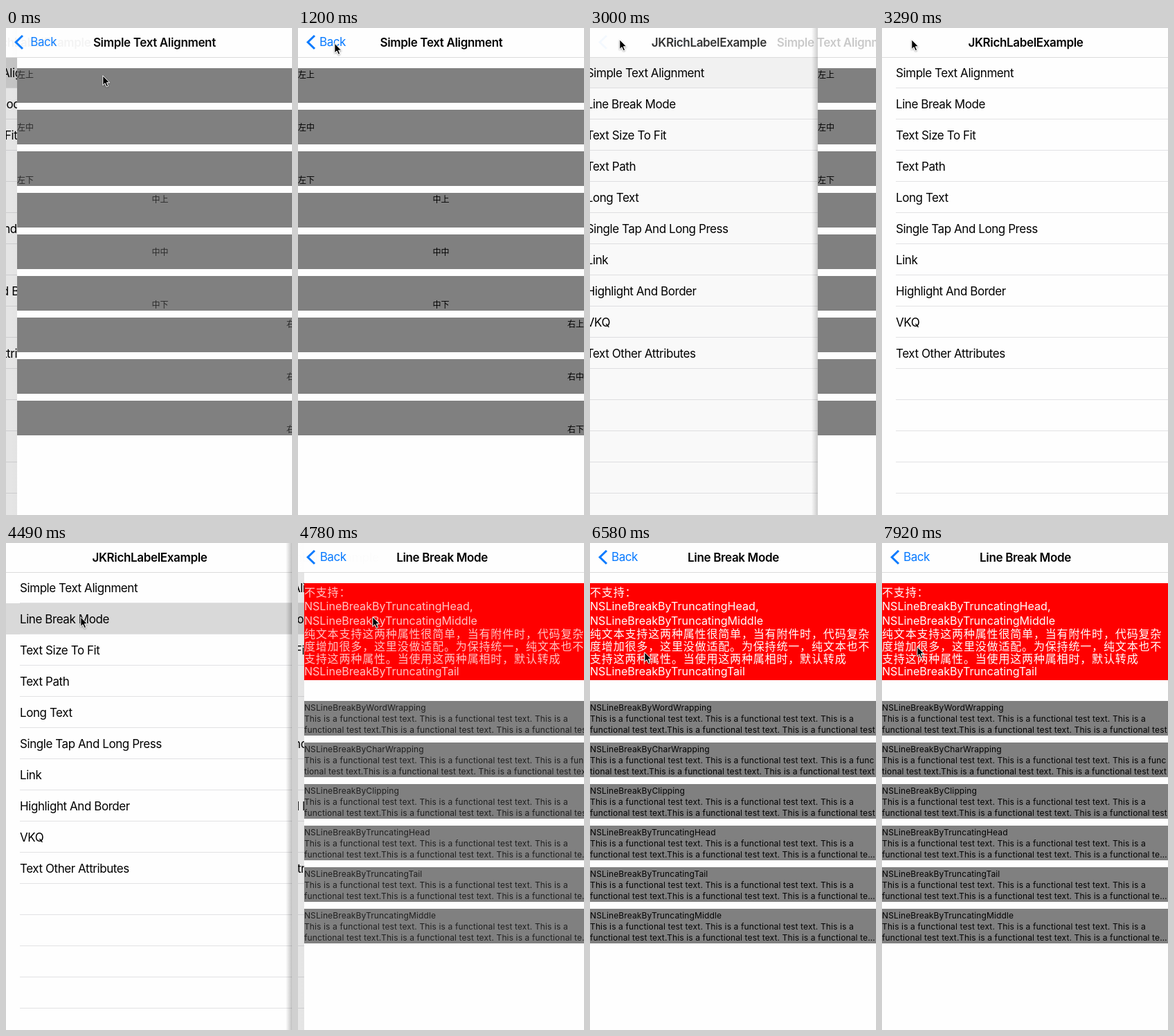
An HTML page for the animation above (8 s loop, 413 px wide and 703 px high).

```html
<!DOCTYPE html>
<html lang="zh-CN">
<head>
<meta charset="utf-8">
<title>Rich label demo</title>
<style>
  html, body { margin: 0; width: 100%; height: 100%; overflow: hidden; background: #fefefe; }
  svg { display: block; width: 100%; height: 100%; }
  text { font-family: Inter, "Noto Sans CJK SC", "Noto Sans CJK", sans-serif; white-space: pre; }
  .title { font-size: 17px; font-weight: 600; letter-spacing: -.34px; text-anchor: middle; }
  .row, .back { font-size: 17px; letter-spacing: -.43px; }
  .note { font-size: 16px; letter-spacing: .05px; fill: #fff; }
  .cjk { font-family: "Noto Sans CJK SC", "Noto Sans CJK", sans-serif; letter-spacing: .84px; }
  .small { font-size: 12px; letter-spacing: .13px; }
  .word { font-size: 12px; font-family: "Noto Sans CJK SC", "Noto Sans CJK", sans-serif; }
</style>
</head>
<body>
<svg viewBox="0 0 413 703" preserveAspectRatio="none">
  <defs>
    <linearGradient id="edge">
      <stop offset="0" stop-opacity="0"/>
      <stop offset="1" stop-opacity=".24"/>
    </linearGradient>
    <filter id="soft" x="-50%" y="-50%" width="200%" height="200%">
      <feDropShadow dx="0" dy="1" stdDeviation="1" flood-opacity=".4"/>
    </filter>
  </defs>
  <rect width="413" height="703" fill="#fefefe"/>
  <g id="list">
    <rect id="mark" width="413" height="45" fill="#d9d9d9"/>
    <g id="rows"></g>
  </g>
  <rect id="dim" y="42" width="413" height="661"/>
  <g id="page">
    <rect y="42" width="413" height="661" fill="#fefefe"/>
    <g id="align"><g class="boxes"></g><g class="copy"></g></g>
    <g id="breaks"><g class="boxes"></g><g class="copy"></g></g>
  </g>
  <rect width="413" height="42" fill="#fefefe"/>
  <rect y="42" width="413" height="1" fill="#dcdcdc"/>
  <text id="home" class="title" y="26.5">JKRichLabelExample</text>
  <text id="head" class="title" y="26.5"></text>
  <g id="back" fill="#087aff">
    <path d="M24 11L14.2 20.5L24 30" fill="none" stroke="#087aff" stroke-width="3"/>
    <text id="label" class="back" y="26">Back</text>
  </g>
  <rect id="shade" width="9" height="703" fill="url(#edge)"/>
  <path id="cursor" d="M.8 .8V14.6L4 11.7L6.2 16.8L8.6 15.8L6.4 10.8H10.6Z"
    fill="#000" stroke="#fff" stroke-width="1" filter="url(#soft)"/>
</svg>
<script>
const $ = s => document.querySelector(s);
const W = 413, LOOP = 8000;

function add(parent, tag, attrs, text = '') {
  const el = document.createElementNS('http://www.w3.org/2000/svg', tag);
  set(el, attrs);
  el.textContent = text;
  parent.append(el);
}
function set(el, attrs) {
  for (const k in attrs) el.setAttribute(k, attrs[k]);
}
const shift = (x, y = 0) => `translate(${x} ${y})`;

function buildList() {
  const names = ['Simple Text Alignment', 'Line Break Mode', 'Text Size To Fit', 'Text Path',
    'Long Text', 'Single Tap And Long Press', 'Link', 'Highlight And Border', 'VKQ',
    'Text Other Attributes'];
  for (let i = 0; i < 14; i++) {
    add($('#rows'), 'rect', { x: 20, y: 86 + 45 * i, width: 393, height: 1, fill: '#e2e2e4' });
    if (names[i]) add($('#rows'), 'text', { class: 'row', x: 20, y: 71 + 45 * i }, names[i]);
  }
}

function buildAlign() {
  const anchors = ['start', 'middle', 'end'];
  for (let i = 0; i < 9; i++) {
    const col = Math.floor(i / 3), row = i % 3, y = 58 + 60 * i;
    add($('#align .boxes'), 'rect', { y, width: W, height: 50, fill: '#808080' });
    add($('#align .copy'), 'text',
      { class: 'word', x: col * W / 2, y: y + 13.5 + 16 * row, 'text-anchor': anchors[col] },
      '左中右'[col] + '上中下'[row]);
  }
}

function buildBreaks() {
  const boxes = $('#breaks .boxes'), copy = $('#breaks .copy');
  const pre = 'NSLineBreakBy', say = 'This is a functional test text.';
  add(boxes, 'rect', { y: 58, width: W, height: 140, fill: '#f00' });
  const notes = [
    [77, '不支持：'],
    [97, pre + 'TruncatingHead,'],
    [118, pre + 'TruncatingMiddle'],
    [137, '纯文本支持这两种属性很简单，当有附件时，代码复杂'],
    [155, '度增加很多，这里没做适配。为保持统一，纯文本也不'],
    [173, '支持这两种属性。当使用这两种属相时，默认转成'],
    [191, pre + 'TruncatingTail']];
  for (const [y, s] of notes)
    add(copy, 'text', { class: s.startsWith(pre) ? 'note' : 'note cjk', x: 0, y }, s);

  const modes = ['WordWrapping', 'CharWrapping', 'Clipping', 'TruncatingHead', 'TruncatingTail',
    'TruncatingMiddle'];
  modes.forEach((mode, i) => {
    const y = 228 + 60 * i, chars = i === 1;
    const end = chars ? 'test text' : i > 2 ? 'te…' : 'test';
    const lines = [pre + mode,
      `${say} ${say} This is a${chars ? ' func' : ''}`,
      `${chars ? '' : 'func'}tional test text.${say} This is a functional ${end}`];
    add(boxes, 'rect', { y, width: W, height: 50, fill: '#808080' });
    lines.forEach((s, n) =>
      add(copy, 'text', { class: 'small', x: 0, y: y + [13.5, 30, 46][n] }, s));
  });
}

// Moments at which the screen refreshes; the picture holds in between.
const ticks = [0, 150, 300, 750, 900, 1050, 1200, 1350, 2850, 3000, 3150, 3290, 3440, 3590, 3740,
  3890, 4040, 4490, 4640, 4780, 4930, 5080, 6280, 6430, 6580, 6720, 6870, 7020, 7470, 7620,
  7770, 7920];
const hold = t => ticks.findLast(k => k <= t);

// Pointer moves: start, end, target x, target y.
const moves = [
  [600, 1350, 42, 16], [3290, 3890, 104, 101], [3890, 4040, 107, 106],
  [6130, 7020, 50, 206], [7320, 7920, 50, 149]];

function pointer(t) {
  let x = 139, y = 68;
  for (const [from, to, tx, ty] of moves) {
    const p = Math.min(1, Math.max(0, (t - from) / (to - from)));
    const e = p * p * (3 - 2 * p);
    x += (tx - x) * e;
    y += (ty - y) * e;
  }
  return [x, y];
}

// Remaining share of a critically damped spring.
function rest(ms, w = 19.8) {
  const s = Math.max(0, ms) * w / 1000;
  const r = (1 + s) * Math.exp(-s);
  return r < .002 ? 0 : r;
}

function draw(time) {
  const t = hold(time);
  const second = t >= 4490, pop = t >= 2850 && !second;
  const start = second ? 4490 : pop ? 2850 : -255;
  const r = rest(t - start), nav = rest(t - start, second ? 25 : 19.8);
  const away = pop ? 1 - r : r;
  const navAway = pop ? 1 - nav : nav;
  const x = W * away;

  set($('#list'), { transform: shift(-.3 * (W - x)) });
  set($('#mark'), { y: second ? 87 : 42, opacity: pop ? r : 1 });
  set($('#dim'), { opacity: .1 * (1 - away) });
  set($('#page'), { transform: shift(x) });
  set($('#align'), { display: second ? 'none' : 'inline' });
  set($('#breaks'), { display: second ? 'inline' : 'none' });
  const ink = pop ? 1 : Math.min(1, (t - start) / 380);
  for (const el of document.querySelectorAll('.copy')) set(el, { opacity: ink });
  set($('#shade'), { x: x - 9, opacity: r ? away : 0 });

  $('#head').textContent = second ? 'Line Break Mode' : 'Simple Text Alignment';
  set($('#head'), { x: 207 + 190 * navAway, opacity: 1 - navAway });
  set($('#home'), { x: 207.5 - 175 * (1 - navAway), opacity: navAway });
  set($('#back'), { opacity: (pop ? .2 : 1) * (1 - navAway) });
  set($('#label'), { x: 31 + 110 * navAway });
  set($('#cursor'), { transform: shift(...pointer(t)) });
}

buildList();
buildAlign();
buildBreaks();
const begin = performance.now();
function loop() {
  draw((performance.now() - begin) % LOOP);
  requestAnimationFrame(loop);
}
loop();
</script>
</body>
</html>
```
